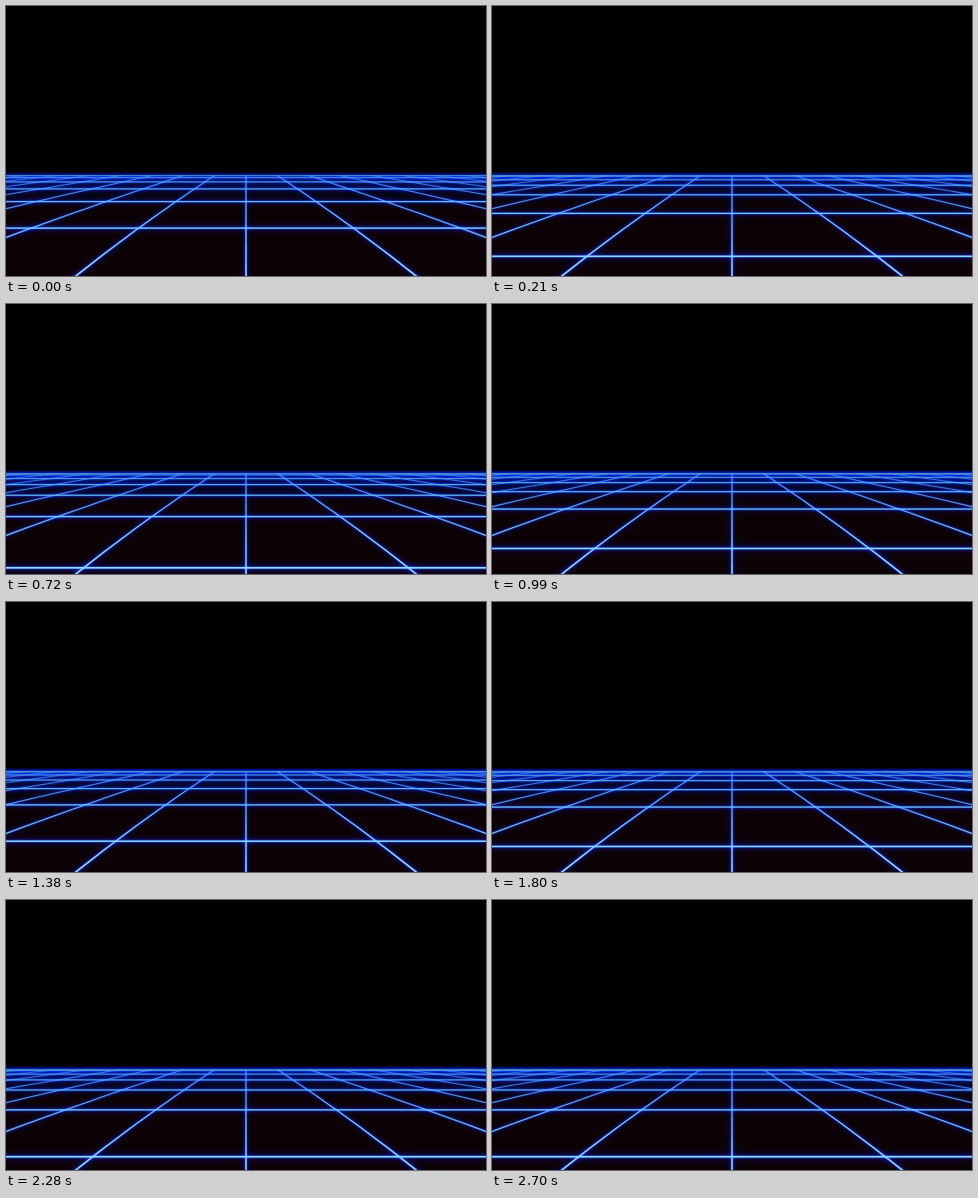
An HTML page with a canvas that plays this animation: 480x270 px, repeating every 2.73 s.

```html
<!DOCTYPE html>
<html lang="en">
<head>
<meta charset="utf-8">
<title>Neon grid</title>
<style>
  html, body { margin: 0; height: 100%; overflow: hidden; background: #000; }
  canvas { display: block; }
</style>
</head>
<body>
<canvas id="stage" width="480" height="270"></canvas>
<script>
const ctx = document.getElementById('stage').getContext('2d');
const W = 480, H = 270, CX = W / 2, TOP = 169.6;
const TICK = 30, TICKS = 91;
const STEPS_PER_TICK = 0.812, STEPS_PER_CELL = 11;

function verticalGradient(from, to, ...stops) {
  const gradient = ctx.createLinearGradient(0, from, 0, to);
  for (const [at, color] of stops) gradient.addColorStop(at, color);
  return gradient;
}

const floorFill = verticalGradient(165.5, 200,
  [0, '#000'], [0.05, '#020634'], [0.2, '#030a38'], [0.55, '#05041a'], [1, '#0c0104']);
const coreFill = verticalGradient(168, 262,
  [0, '#4f9fc0'], [0.15, '#5cb0dc'], [0.45, '#72c8f8'], [1, '#94dcff']);

// Each pass: half width, colour, blend mode
const PASSES = [
  [7.5, 'rgba(0,8,80,.16)', 'lighter'],
  [4.2, 'rgba(0,16,120,.26)', 'lighter'],
  [1.9, 'rgba(8,50,180,.5)', 'lighter'],
  [0.88, coreFill, 'source-over']
];

// Height of a cross line at a given depth in cells
const rowY = s => 160 + 1 / (0.0161 + 0.0102 * s + 0.0018 * s * s);

// Width of one cell at a given height, and its inverse
const cellWidth = y => 32 + (Math.sqrt(0.429 + 0.002 * (y - 170)) - 0.655) / 0.001;
const cellY = w => 170 + 0.655 * (w - 32) + 0.0005 * (w - 32) ** 2;

const thickness = w => 0.48 + 0.52 * w / 170;

function drawRow(y, half) {
  const h = half * thickness(cellWidth(y));
  ctx.fillRect(0, y - h, W, 2 * h);
}

function drawColumn(n, half) {
  const slant = Math.hypot(1, 1.42 * n);
  const left = [], right = [];
  for (let w = 31; w <= 176; w += 8) {
    const h = half * slant * thickness(w) * 0.85;
    left.push([CX + n * w - h, cellY(w)]);
    right.unshift([CX + n * w + h, cellY(w)]);
  }
  ctx.beginPath();
  for (const [x, y] of left.concat(right)) ctx.lineTo(x, y);
  ctx.fill();
}

function draw(time) {
  const tick = Math.floor(time / TICK) % TICKS;
  const phase = Math.round(tick * STEPS_PER_TICK) / STEPS_PER_CELL % 1;
  const rows = [TOP];
  for (let i = 0; i < 7; i++) {
    const y = rowY(i - phase);
    if (y > TOP && y < H + 8) rows.push(y);
  }

  ctx.globalCompositeOperation = 'source-over';
  ctx.globalAlpha = 1;
  ctx.fillStyle = '#000';
  ctx.fillRect(0, 0, W, H);
  ctx.fillStyle = floorFill;
  ctx.fillRect(0, 165.5, W, H);

  ctx.save();
  ctx.beginPath();
  ctx.rect(0, 166, W, H);
  ctx.clip();
  for (const [half, color, blend] of PASSES) {
    ctx.globalCompositeOperation = blend;
    ctx.fillStyle = color;
    for (let n = -7; n <= 7; n++) {
      ctx.globalAlpha = 1 / (1 + 0.15 * Math.max(0, Math.abs(n) - 1));
      drawColumn(n, half);
    }
    for (const y of rows) {
      ctx.globalAlpha = Math.min(1, 0.8 + (y - TOP) / 50);
      drawRow(y, half);
    }
  }
  ctx.restore();
}

const start = performance.now();
function loop() {
  draw(performance.now() - start);
  requestAnimationFrame(loop);
}
loop();
</script>
</body>
</html>
```
